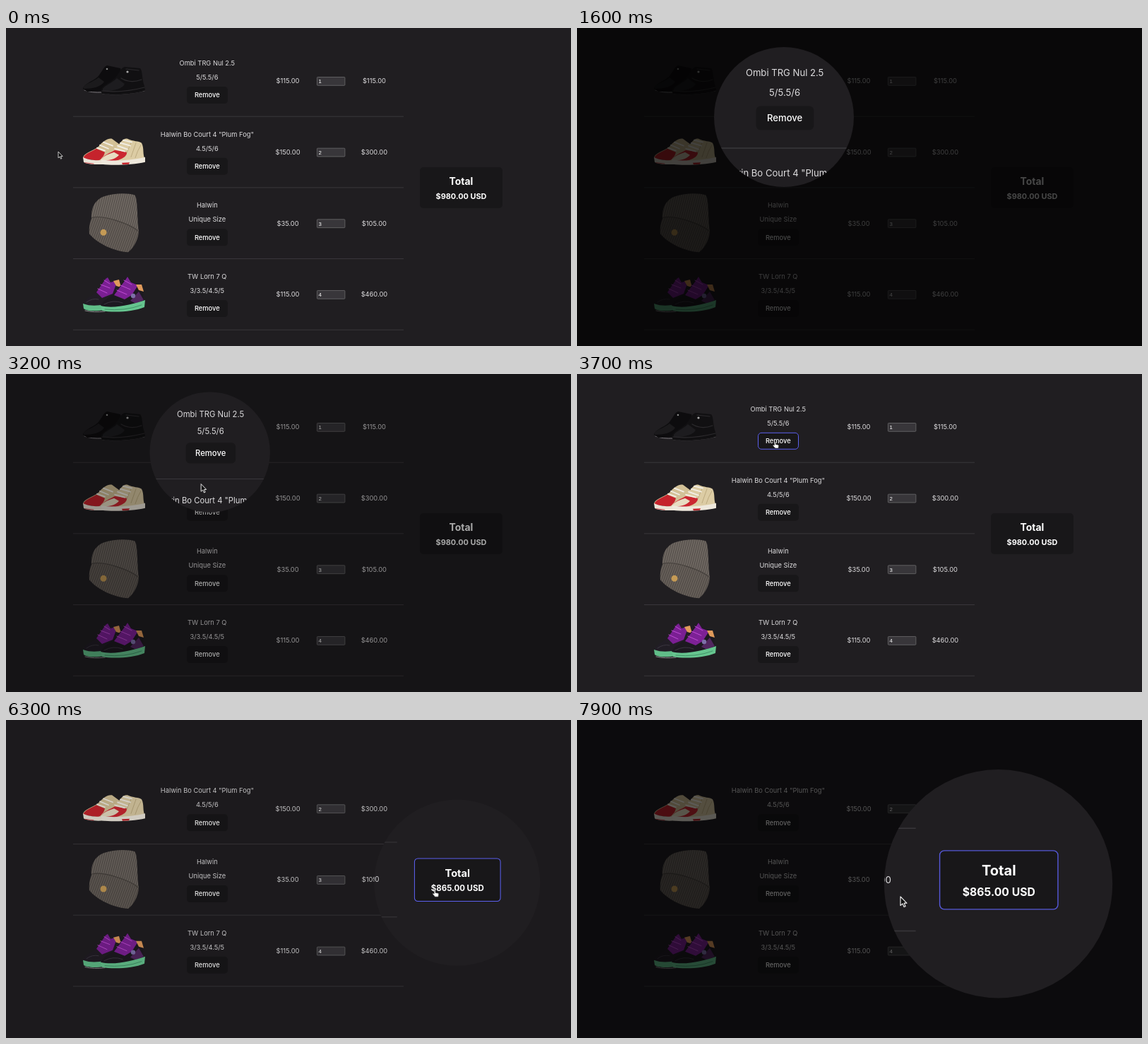
Write an HTML page that moves like this. It is 800x450 px and loops after 8000 ms.

```html
<!DOCTYPE html>
<html lang="en">
<head>
<meta charset="utf-8">
<title>Cart</title>
<style>
  html, body { margin: 0; width: 100%; height: 100%; overflow: hidden; background: #201e21; }
  svg { display: block; width: 800px; height: 450px; }
  text { font: 9.3px Inter, "Liberation Sans", sans-serif; fill: #dddcde; text-anchor: middle; }
  .strong { font-weight: 500; fill: #fff; }
  .field { font: 7.8px "Liberation Sans", Arial, sans-serif; fill: #fff; text-anchor: start; }
  .total { font-size: 13.95px; font-weight: 700; fill: #fff; }
  .sum { font-size: 10.9px; font-weight: 700; fill: #fff; }
  .box { fill: #181719; }
  .ring { fill: none; stroke: #5c60ee; }
</style>
</head>
<body>
<svg viewBox="0 0 800 450">
  <defs>
    <clipPath id="hole"><circle id="disc"/></clipPath>
    <pattern id="rib" width="3" height="3" patternUnits="userSpaceOnUse" patternTransform="rotate(14)">
      <path fill="#706963" d="M0 0H3V3H0Z"/><path fill="#514b47" d="M0 0H1.1V3H0Z"/>
    </pattern>
    <pattern id="cuff" width="3" height="3" patternUnits="userSpaceOnUse" patternTransform="rotate(20)">
      <path fill="#67605a" d="M0 0H3V3H0Z"/><path fill="#4d4743" d="M0 0H1.1V3H0Z"/>
    </pattern>
  </defs>
  <g id="page">
    <rect width="800" height="450" fill="#201e21"/>
    <g id="rows"></g>
    <rect class="box" x="586" y="197" width="117" height="58" rx="5"/>
    <rect class="ring" id="totalRing" x="586.5" y="197.5" width="116" height="57.5" rx="4.5"/>
    <text class="total" x="644.5" y="221.8">Total</text>
    <text class="sum" id="sum" x="644.5" y="241.7"></text>
    <g id="cursor">
      <path id="arrow" fill="#111" stroke="#eee" stroke-width=".8" stroke-linejoin="round"
        d="M0 0V8.8L2.1 7L3.5 10.2L4.9 9.6L3.6 6.5H6.2Z"/>
      <path id="hand" fill="#fff" stroke="#222" stroke-width=".5"
        d="M-1 .8C-1-.4 .8-.4 .8 .8V3.6L4 4.2C5 4.4 5.2 5 5.1 6L4.6 9H.2L-3 5.4C-3.4 4.4-2.2 4-1 5Z"/>
      <path id="beam" fill="none" stroke="#c8c7c9" stroke-width="1"
        d="M-2.5-4.6Q0-4.6 0-3Q0-4.6 2.5-4.6M0-3.5V3.5M-2.5 4.6Q0 4.6 0 3Q0 4.6 2.5 4.6M-1.3 1H1.3"/>
    </g>
  </g>
  <rect id="dim" width="800" height="450" fill="#000"/>
  <g id="lens" clip-path="url(#hole)"><use href="#page"/></g>
</svg>
<script>
const LOOP = 8000, STEP = 100, ROW = 100.66, REMOVED = 4100;
const $ = id => document.getElementById(id);
const path = (fill, d) => `<path fill="${fill}" d="${d}"/>`;
const line = (color, width, d) =>
  `<path fill="none" stroke="${color}" stroke-width="${width}" stroke-linecap="round" d="${d}"/>`;

// Product pictures, with y measured from the middle of the row.
const slipOns =
  line('#777478', 1, 'M111 13Q121 17 137 16') +
  path('#0d0c0e', 'M109 11C110 4 122 1 130-6C136-13 138-20 143-22L162-18L167 5L150 14L115 15Z') +
  path('#1b1a1c', 'M110 8C114 3 124 1 131-5L139 1C135 8 123 11 110 11Z') +
  line('#5f5c60', .8, 'M137 18Q165 21 196 14') +
  path('#111012', 'M134 14C135 6 146 4 155-5C160-11 163-19 168-20L190-18C194-13 192-3 196 7L197 13C190 18 150 21 136 18Z') +
  path('#1d1c1f', 'M137 11C140 6 150 3 157-4L168 4C166 11 150 15 137 14Z') +
  line('#2c2a2d', 1.2, 'M136 14Q165 17 196 9M170-17L188-15M163-4Q176 4 192-2') +
  '<circle cx="172" cy="-13" r="1.6" fill="#aaa"/><circle cx="143" cy="-17" r="1.3" fill="#888"/>';

const courtShoes =
  path('#d3c197', 'M109 8C110 1 122-1 131-8C138-16 144-20 150-19L165-8V8L140 14Z') +
  path('#c5232c', 'M109 9C111 2 120 0 128-5L140 0C138 8 134 11 130 12Z') +
  path('#ebe5d8', 'M109 7C118 12 130 12 140 11V17C128 18 113 17 110 14Z') +
  path('#dccca4', 'M134 12C135 4 148 2 155-4C161-12 165-20 172-19C180-15 188-16 192-13C196-6 193 4 197 10C180 14 150 16 134 12Z') +
  path('#cb2731', 'M135 11C137 4 148 1 154-3L171 0C172 7 160 12 150 13Z') +
  path('#e7ddc2', 'M135 10C139 4 148 2 153 0L160 4C155 10 146 12 135 12Z') +
  line('#b5a277', .8, 'M171 1L177-13M177 7L184-13M183 8Q186-2 191-10') +
  line('#f2eee6', 1.7, 'M129-6L140-2M133-10L145-5M138-14L151-9M154-5L168-1M158-9L172-4M162-13L176-9M166-17L178-14') +
  path('#eee8dc', 'M134 10C150 14 180 11 197 7V14C180 18 150 19 136 17Z') +
  path('#c5232c', 'M164 15L175 14.500L174 17L165 17.500Z') +
  line('#c5232c', .8, 'M112 15L124 16.500');

const beanie =
  path('url(#rib)', 'M121-7C120-20 125-33 139-38C153-43 173-43 182-40C187-35 185-12 188 12L160 16Z') +
  path('url(#cuff)', 'M122-9C137-13 177 0 188 10C188 21 182 34 173 41C154 40 129 29 118 15C117 6 119-3 122-9Z') +
  line('#46413d', 1.2, 'M122-8C138-12 176 1 187 11') +
  '<circle cx="138" cy="13" r="4.5" fill="#c49a55"/>';

const hoopShoes =
  line('#8c8a8d', 1, 'M112 23Q125 26 140 24') +
  path('#211d25', 'M109 13C112 5 124 1 134-7C140-15 140-22 143-25L148-20L160-21L166 0L150 16L120 17Z') +
  path('#7a1f93', 'M128-3L141-22L144-24L148-17L158-20L151-1L136 5Z') +
  path('#df9a5b', 'M152-19L160-21L163-10L156-12Z') +
  path('#60bd88', 'M109 13C120 17 130 16 140 14V22C128 24 114 24 110 20Z') +
  path('#1c1920', 'M134 16C138 7 150 3 158-6C164-16 168-24 172-25L176-19L192-12C196-4 192 4 197 12L180 18L140 21Z') +
  path('#7d2196', 'M153 1L168-19L172-25L177-17L187-13L178 1L168 7Z') +
  path('#df9a5b', 'M184-14L192-14L195-4L188-6Z') +
  path('#51275f', 'M176 9L188-4L195 8L184 13Z') +
  line('#c04cd4', 1, 'M139-20L147-15M134-14L147-9M130-8L143-2M167-20L178-14M162-13L176-7M157-6L171 0') +
  line('#3b3640', 1, 'M139 14Q152 7 165 12M114 11Q122 5 131 7') +
  '<circle cx="180" cy="2" r="3.200" fill="#7d70a8"/>' +
  path('#66c58f', 'M134 16C152 21 180 14 197 8L196 18C180 25 150 26 136 23Z') +
  line('#37855c', .8, 'M140 21Q168 24 192 15');

const items = [
  ['Ombi TRG Nul 2.5', '5/5.5/6', 115, slipOns],
  ['Halwin Bo Court 4 "Plum Fog"', '4.5/5/6', 150, courtShoes],
  ['Halwin', 'Unique Size', 35, beanie],
  ['TW Lorn 7 Q', '3/3.5/4.5/5', 115, hoopShoes],
];
const usd = n => `$${n.toFixed(2)}`;

$('rows').innerHTML = items.map(([name, sizes, price, art], i) => `
  <g transform="translate(0 ${75 + i * ROW})">
    ${art}
    <text x="284.8" y="-21.900">${name}</text>
    <text x="284.8" y="-2">${sizes}</text>
    <rect class="box" x="256" y="8" width="58" height="24" rx="4.5"/>
    <rect class="ring" x="256.500" y="8.300" width="57" height="23" rx="4.5" opacity="0"/>
    <text class="strong" x="284.8" y="23.200">Remove</text>
    <text x="399" y="3.200">${usd(price)}</text>
    <rect x="440.400" y="-5.500" width="39.500" height="11.800" rx="1" fill="#38363a" stroke="#757476" stroke-width=".7"/>
    <text class="field" x="442.500" y="3.300">${i + 1}</text>
    <text x="521.400" y="3.200">${usd(price * (i + 1))}</text>
    <path d="M95 50.200H563" stroke="#39373b"/>
  </g>`).join('');

const firstRow = $('rows').firstElementChild;
const removeRing = firstRow.querySelector('.ring');

// [time, x, y, shape from this time on]
const moves = [
  [0, 74, 175, 'arrow'], [250, 74, 175, 'arrow'], [1000, 236, 138.5, 'arrow'],
  [1500, 262, 190, 'arrow'], [2900, 262, 190, 'arrow'], [3400, 280, 99, 'hand'],
  [3600, 280.5, 96, 'hand'], [REMOVED, 280, 96, 'beam'], [4800, 280, 96, 'beam'],
  [5150, 300, 87, 'arrow'], [5850, 610, 238, 'hand'], [6050, 614, 240, 'hand'],
  [7500, 614, 240, 'hand'], [7750, 575, 242, 'arrow'], [7900, 548, 242.5, 'arrow'],
  [LOOP, 540, 243, 'arrow'],
];

// Each magnifier: circle, fixed point of the zoom, its gain, and [start, end] spans.
const lenses = [
  { cx: 284, cy: 94, r: 70.2, ox: 262, oy: 16, gain: .455,
    grow: [530, 1860], shade: [500, 1600], close: [2700, 3660] },
  { cx: 644, cy: 230, r: 112, ox: 751, oy: 226, gain: .52,
    grow: [6110, 7110], shade: [6060, 6960], close: [7670, 8620] },
];
const DARK = .72;

const ease = (t, [a, b]) => {
  const u = Math.min(1, Math.max(0, (t - a) / (b - a)));
  return u * u * (3 - 2 * u);
};

function drawCursor(t) {
  const i = moves.findLastIndex(m => m[0] <= t);
  const [t0, x0, y0, shape] = moves[i];
  const [t1, x1, y1] = moves[i + 1];
  const k = ease(t, [t0, t1]);
  $('cursor').setAttribute('transform', `translate(${x0 + (x1 - x0) * k} ${y0 + (y1 - y0) * k})`);
  for (const id of ['arrow', 'hand', 'beam']) $(id).style.display = id === shape ? '' : 'none';
}

function drawLens(t) {
  const l = lenses[t < 4500 ? 0 : 1];
  const left = 1 - ease(t, l.close);
  const dark = DARK * ease(t, l.shade) * left;
  const scale = 1 + l.gain * ease(t, l.grow) * left;
  $('dim').setAttribute('opacity', dark);
  $('lens').style.display = dark > 0 ? '' : 'none';
  $('lens').setAttribute('transform',
    `translate(${l.ox} ${l.oy}) scale(${scale}) translate(${-l.ox} ${-l.oy})`);
  for (const [name, value] of [['cx', l.cx], ['cy', l.cy], ['r', l.r]]) $('disc').setAttribute(name, value);
}

function draw(t) {
  const removed = t >= REMOVED;
  firstRow.style.display = removed ? 'none' : '';
  $('rows').setAttribute('transform', `translate(0 ${removed ? -ROW / 2 : 0})`);
  $('sum').textContent = `${usd(removed ? 865 : 980)} USD`;
  removeRing.setAttribute('opacity', ease(t, [3400, 3650]));
  $('totalRing').setAttribute('opacity', ease(t, [5850, 6150]) * (1 - .15 * ease(t, [7750, 8000])));
  drawCursor(t);
  drawLens(t);
}

const start = performance.now();
function tick() {
  const t = (performance.now() - start) % LOOP;
  draw(Math.floor(t / STEP) * STEP);
  requestAnimationFrame(tick);
}
tick();
</script>
</body>
</html>
```
